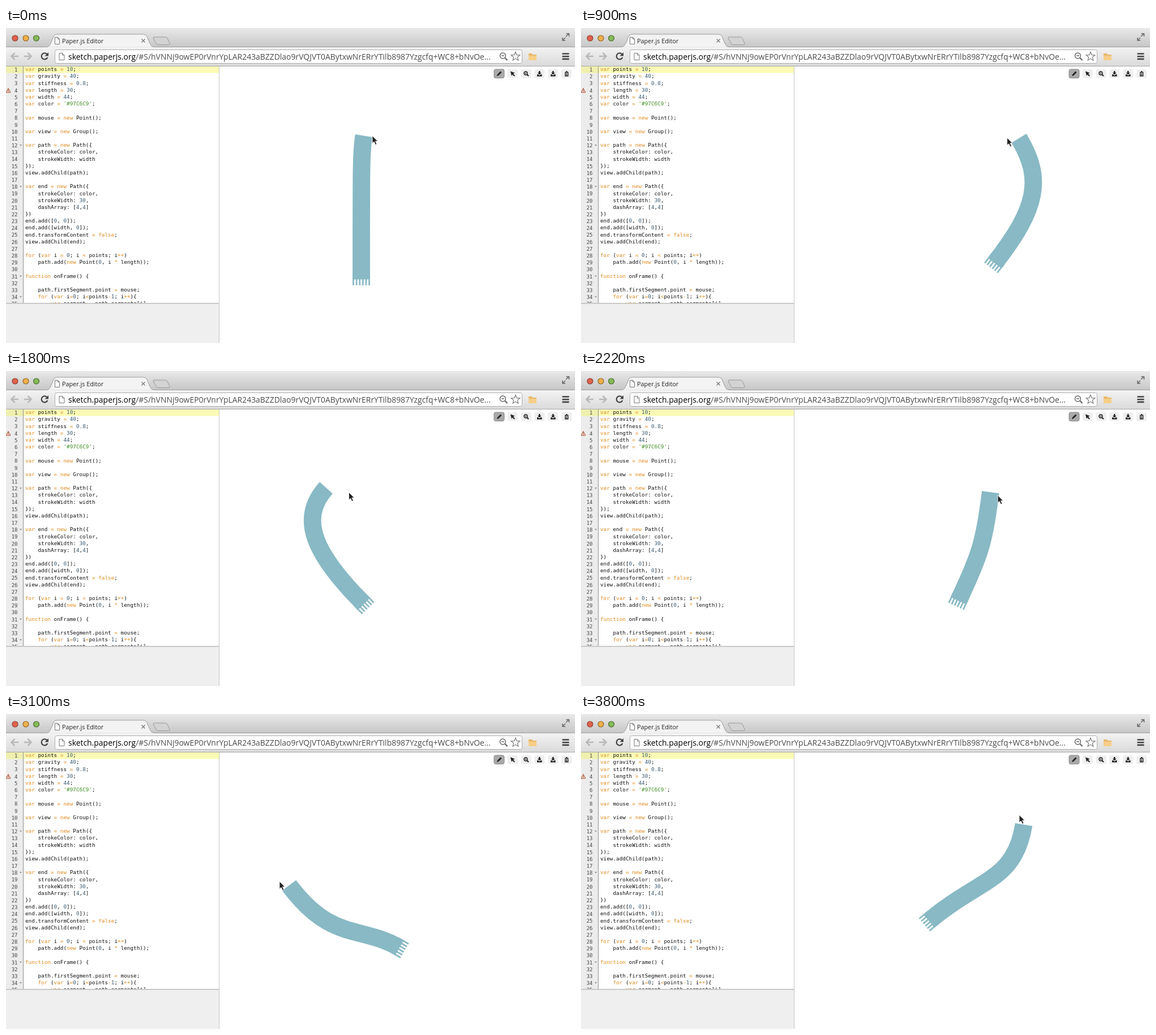
These frames come from a looping animation (1005x557 px, 3820 ms). An HTML page:

```html
<!DOCTYPE html>
<html lang="en">
<head>
<meta charset="utf-8">
<title>Scarf sketch</title>
<style>
  html, body { margin: 0; width: 100%; height: 100%; overflow: hidden; background: #fff; }
  svg { display: block; position: absolute; left: 0; top: 0; }
  .ui { font-family: "Open Sans", "Noto Sans", sans-serif; }
  .code text { font: 9.33px "DejaVu Sans Mono", "Liberation Mono", monospace; white-space: pre; fill: #111; }
  .code .gut { font-size: 9px; fill: #444; text-anchor: end; }
  .key { fill: #e08a1c; }
  .num { fill: #3a5a70; }
  .str { fill: #3f8f22; }
</style>
</head>
<body>
<svg width="1005" height="557" viewBox="0 0 1005 557">
  <defs>
    <linearGradient id="strip" x2="0" y2="1">
      <stop offset="0" stop-color="#e9e9e9"/><stop offset="1" stop-color="#c6c6c6"/>
    </linearGradient>
    <linearGradient id="bar" x2="0" y2="1">
      <stop offset="0" stop-color="#f3f3f3"/><stop offset="1" stop-color="#dadada"/>
    </linearGradient>
    <clipPath id="pane"><rect y="68" width="376" height="418"/></clipPath>
  </defs>

  <!-- window and tabs -->
  <rect width="1005" height="34" fill="url(#strip)"/>
  <g stroke-width="1.200">
    <circle cx="16" cy="18" r="5" fill="#e0614c" stroke="#8f4033"/>
    <circle cx="35" cy="18" r="5" fill="#eeb04a" stroke="#94662a"/>
    <circle cx="53.5" cy="18" r="5" fill="#86b958" stroke="#4c7030"/>
  </g>
  <rect y="33.5" width="1005" height="34" fill="url(#bar)"/>
  <path d="M0 33.5H70C76 33.5 77 31 79 27L84 15Q86 11 90 11H243Q247 11 249 15L254 27C256 31 257 33.5 263 33.5H1005" fill="#f3f3f3" stroke="#9c9c9c"/>
  <path d="M262 16H281Q284 16 285 18L289 27Q290 29.500 287 29.500H269Q266 29.500 265 27L260 18Q259.500 16 262 16Z" fill="#d3d3d3" stroke="#999"/>
  <path d="M86.500 16.500h5l3 3v9h-8zM91.500 16.500v3h3" fill="#fff" stroke="#777"/>
  <text class="ui" x="99" y="26.500" font-size="10.8" fill="#222">Paper.js Editor</text>
  <path d="M239.500 19.500l6 6m0-6l-6 6" stroke="#777" stroke-width="1.300"/>
  <path d="M989 15l5-5m-4.500 0h5v5M988 17l-5 5m0-5v5h5" fill="none" stroke="#666" stroke-width="1.500"/>

  <!-- toolbar -->
  <g fill="none" stroke="#b9b9b9" stroke-width="2.600">
    <path d="M22 50H10M15.500 44L9.500 50L15.500 56"/>
    <path d="M32 50H44M38.500 44L44.500 50L38.500 56"/>
    <path d="M72.500 46.500A5.500 5.500 0 1 0 73.300 52" stroke="#444" stroke-width="2.200"/>
  </g>
  <path d="M75 43v6.500h-6.500z" fill="#444"/>
  <rect x="86.500" y="38.500" width="825" height="24" rx="3" fill="#fff" stroke="#acacac"/>
  <path d="M94 44.500h5.500l3.500 3.500v8.500h-9zM99.500 44.500v3.500h3.500" fill="#fff" stroke="#777"/>
  <text class="ui" x="110" y="55.500" font-size="13.95" fill="#4c4c4c"><tspan fill="#000">sketch.paperjs.org</tspan>/#S/hVNNj9owEP0rVnrYpLAR243aBZZDlao9rVQJVT0ABytxwNrERrYTilb8987Yzgcfq+WC8+bNvOe...</text>
  <g fill="none" stroke="#666" stroke-width="1.400">
    <circle cx="877.500" cy="49" r="5"/>
    <path d="M875 49h5"/>
    <path d="M881.500 53l4 4" stroke-width="2.300"/>
    <path id="star" stroke="#777" stroke-width="1.200"/>
  </g>
  <path d="M923 45h6l1.500 2H937v10H923z" fill="#e8b96c"/>
  <path d="M923 49H937v8H923z" fill="#f6ce88"/>
  <path d="M982.500 45.500h12m-12 4.700h12m-12 4.700h12" stroke="#444" stroke-width="2.600"/>
  <path d="M0 67.500H1005" stroke="#a9a9a9"/>

  <!-- editor -->
  <rect y="68" width="30" height="419" fill="#ececec"/>
  <rect y="68" width="376" height="11.5" fill="#fbfbb5"/>
  <rect y="68" width="30" height="11.5" fill="#efefae"/>
  <path d="M30.500 68V487" stroke="#8e8e8e"/>
  <g id="code" class="code" clip-path="url(#pane)"/>
  <path d="M4 106.500l4 7.500H0z" fill="#f6dccb" stroke="#a5533b"/>
  <path d="M4 108.800v2.600m0 .8v1" stroke="#8a3324"/>
  <rect y="486" width="377" height="71" fill="#efefef"/>
  <path d="M0 487H376" stroke="#c9c9c9" stroke-width="2"/>
  <path d="M376.500 68V557" stroke="#c6c6c6"/>

  <!-- sketch tools -->
  <g id="tools" fill="#efefef"/>
  <path d="M867 85l1-3 5.500-5.500 2 2-5.500 5.500z" fill="#222"/>
  <path d="M891 76.500l8 3-3.200 1.200 3.200 3.300-1.500 1.500-3.300-3.300-1.200 2.800z" fill="#222"/>
  <g fill="none" stroke="#222" stroke-width="1.400">
    <circle cx="918" cy="80" r="3"/>
    <path d="M916.500 80h3m-1.500-1.500v3" stroke-width=".9"/>
    <path d="M920.300 82.300l2.700 2.700" stroke-width="2"/>
    <path d="M987 78.500h6.500M989 77h2.500"/>
    <path d="M987.700 79.500v5.300h5v-5.300M990.200 80v4"/>
  </g>
  <g fill="#222">
    <path id="save" d="M941 76h2.500v3h2.300l-3.500 3.500-3.500-3.500h2.200zM938 82h2l2.300 2 2.300-2h2v3.500h-8.600z"/>
    <use href="#save" x="24"/>
  </g>

  <!-- scarf -->
  <g fill="none" stroke="#88b9c4">
    <path id="scarf" stroke-width="30.800"/>
    <path id="fringe" d="M0-15.400V15.400" stroke-width="21" stroke-dasharray="2.800"/>
  </g>
  <path id="mouse" d="M0 0V13.500L3.100 10.700L5.500 16L8 14.900L5.600 9.700H9.700Z" fill="#222" stroke="#fff" stroke-width=".9"/>
</svg>

<script>
const $ = id => document.getElementById(id);
const NS = 'http://www.w3.org/2000/svg';

function add(parent, tag, attrs, text = '') {
  const el = document.createElementNS(NS, tag);
  for (const k in attrs) el.setAttribute(k, attrs[k]);
  el.textContent = text;
  return parent.appendChild(el);
}

const source = `var points = 10;
var gravity = 40;
var stiffness = 0.8;
var length = 30;
var width = 44;
var color = '#97C6C9';

var mouse = new Point();

var view = new Group();

var path = new Path({
    strokeColor: color,
    strokeWidth: width
});
view.addChild(path);

var end = new Path({
    strokeColor: color,
    strokeWidth: 30,
    dashArray: [4,4]
})
end.add([0, 0]);
end.add([width, 0]);
end.transformContent = false;
view.addChild(end);

for (var i = 0; i < points; i++)
    path.add(new Point(0, i * length));

function onFrame() {

    path.firstSegment.point = mouse;
    for (var i=0; i<points-1; i++){
        var segment = path.segments[i]`;

const token = /('[^']*')|\b(var|new|for|function|false)\b|([=<*+-]+)|\b(\d[\d.]*)|[^'=<*+\-\d\s\w]+|\w+|\s+/g;

source.split('\n').forEach((line, i) => {
  const y = 76.3 + i * 12.18;
  add($('code'), 'text', { x: 20.5, y: y + .8, class: 'gut' }, i + 1);
  if (/[{]$/.test(line))
    add($('code'), 'path', { d: `M24 ${y - 4}h4l-2 2.500z`, fill: '#888' });
  const row = add($('code'), 'text', { x: 34, y });
  for (const [text, str, word, op, num] of line.matchAll(token))
    add(row, 'tspan', { class: str ? 'str' : word || op ? 'key' : num ? 'num' : '' }, text);
});

for (let i = 0; i < 6; i++)
  add($('tools'), 'rect', {
    x: 862 + i * 23.8, y: 73, width: 18, height: 15.5, rx: 3,
    ...(i ? {} : { fill: '#a9a9a9', stroke: '#888' })
  });

const rad = deg => deg * Math.PI / 180;
const polar = (x, y, r, deg) => [x + r * Math.cos(rad(deg)), y + r * Math.sin(rad(deg))];

$('star').setAttribute('d', 'M' + Array.from({ length: 10 }, (_, i) =>
  polar(900, 50.5, i % 2 ? 3.6 : 8.2, i * 36 - 90)).join('L') + 'Z');

// time, head x and y, pull of the mouse on it, reach and bearing of the tail,
// angles of the cloth at head and tail, share of the curve led by the head
const poses = [
  [0, 632, 190.5, 15, 0, 254, 91, 99, 90, .13],
  [900, 773.5, 195, -21, -1, 225, 101, 59, 128, .4],
  [1260, 616, 200.5, -29, 0, 244, 50.5, 41, 72, .5],
  [1800, 565.5, 206.5, 40, 8, 216, 72, 132, 45, .37],
  [2230, 725, 215, 12, 6, 200, 106, 95, 115, .5],
  [2660, 604, 253.5, -16, 54, 182, 32.5, -47, 75, .41],
  [3100, 500, 303, -17, -7, 224, 29.5, 53, 30, .61],
  [3800, 782, 195.5, -8, -17, 239, 134.5, 99, 140, .46]
];
const LOOP = 3820, STEP = 20, LAG = 75;

// the head moves along the pull, everything else drifts from pose to pose
function slope(i, k) {
  if (k < 3) return poses[i][k + 2] / LAG;
  const a = poses[Math.max(i - 1, 0)], b = poses[Math.min(i + 1, poses.length - 1)];
  return (b[k] - a[k]) / (b[0] - a[0]);
}

function poseAt(t) {
  let i = 0;
  while (i < poses.length - 2 && poses[i + 1][0] <= t) i++;
  const a = poses[i], b = poses[i + 1], span = b[0] - a[0], u = (t - a[0]) / span, v = 1 - u;
  return a.slice(1).map((p, j) => {
    const k = j + 1;
    return v * v * ((1 + 2 * u) * p + u * span * slope(i, k))
         + u * u * ((3 - 2 * u) * b[k] - v * span * slope(i + 1, k));
  });
}

function draw(now) {
  const t = Math.floor(now % LOOP / STEP) * STEP;
  const [x, y, pullX, pullY, reach, bearing, headAngle, tailAngle, share] = poseAt(t);
  const tail = polar(x, y, reach, bearing), bend = .92 * reach;
  const c1 = polar(x, y, bend * share, headAngle);
  const c2 = polar(...tail, -bend * (1 - share), tailAngle);
  $('scarf').setAttribute('d', `M${x} ${y}C${[c1, c2, tail].join(' ')}`);
  $('fringe').setAttribute('transform', `translate(${tail}) rotate(${tailAngle})`);
  $('mouse').setAttribute('transform', `translate(${x + pullX} ${y + pullY})`);
}

const start = performance.now();
function tick() {
  draw(performance.now() - start);
  requestAnimationFrame(tick);
}
tick();
</script>
</body>
</html>
```
